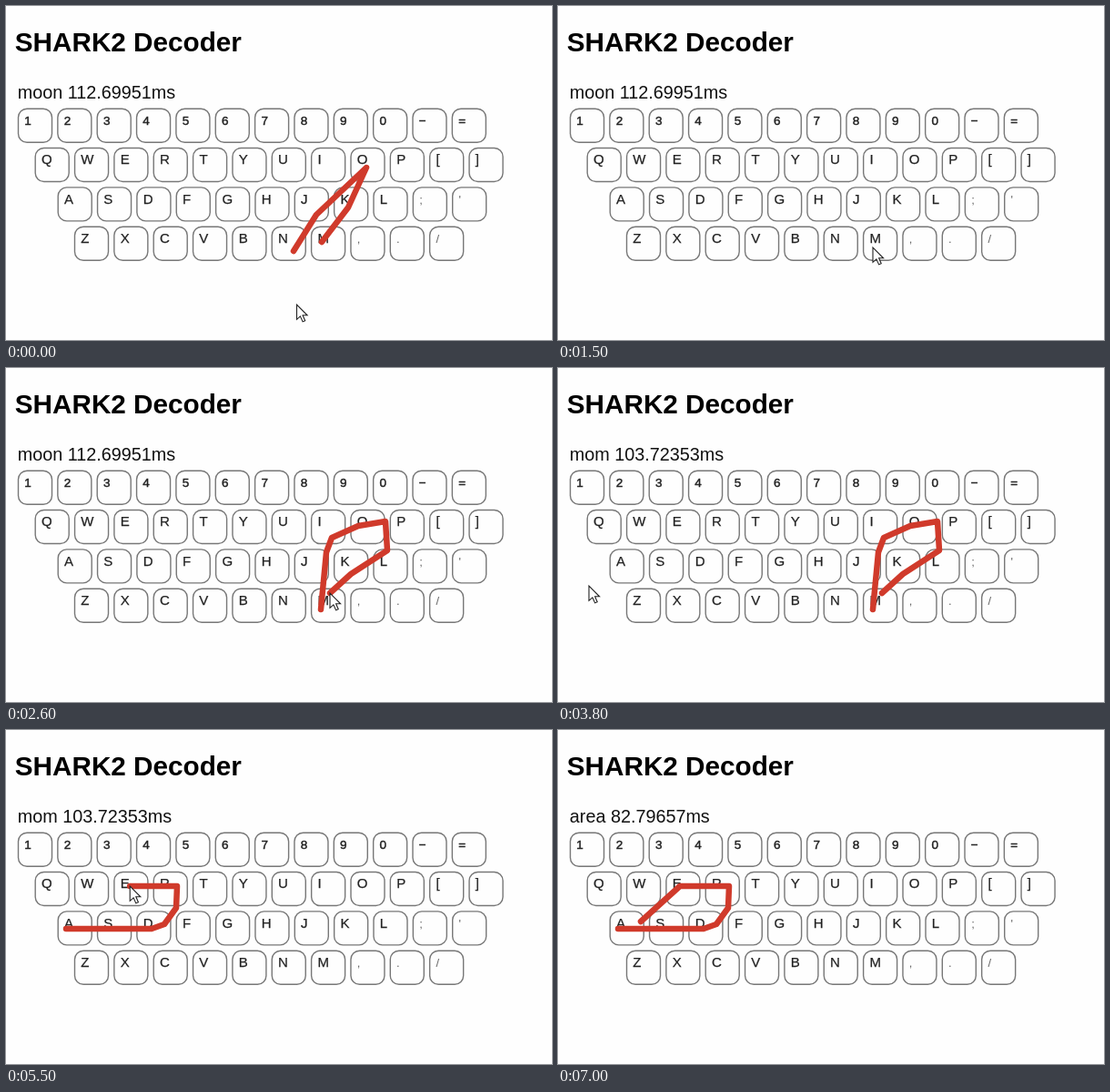
These frames come from a looping animation (600 by 368 pixels, 7300 ms). An HTML page:

```html
<!DOCTYPE html>
<html lang="en">
<head>
<meta charset="utf-8">
<title>SHARK2 Decoder</title>
<style>
  html, body { margin: 0; width: 100%; height: 100%; overflow: hidden; background: #fefefe; }
  svg { display: block; width: 600px; height: 368px; font-family: "Liberation Sans", Arial, sans-serif; }
  .title { font-size: 29.7px; font-weight: bold; }
  .result { font-size: 19.8px; fill: #111; }
  .key rect { fill: #fefefe; stroke: #777; stroke-width: 1.4; }
  .key text { font-size: 15px; fill: #222; stroke: #222; stroke-width: .25; }
  .key .digit { font-size: 13.5px; stroke-width: .45; }
  .key .mark { font-size: 13px; fill: #666; stroke: none; }
  polyline { fill: none; stroke: #d03a2b; stroke-width: 6.5; stroke-linecap: round; stroke-linejoin: round; }
  #cursor { fill: #fff; stroke: #222; stroke-width: 1.1; }
</style>
</head>
<body>
<svg viewBox="0 0 600 368">
  <text class="title" x="9.8" y="49.5">SHARK2 Decoder</text>
  <text class="result" id="result" x="12.8" y="102.3"></text>
  <g id="keys"></g>
  <g id="paths"></g>
  <path id="cursor" d="M0 0V16.3L3.9 12.8 6.6 18.9 9.2 17.8 6.6 11.8H11.6Z"/>
</svg>
<script>
const LOOP = 7300, STEP = 100, PITCH = 43.35;
const $ = id => document.getElementById(id);

function addNode(parent, name, attrs) {
  const node = document.createElementNS("http://www.w3.org/2000/svg", name);
  for (const k in attrs) node.setAttribute(k, attrs[k]);
  return parent.appendChild(node);
}

// Keyboard rows: left edge and labels
const rows = [
  [13.5, "1234567890−="],
  [32.2, "QWERTYUIOP[]"],
  [57.2, "ASDFGHJKL;'"],
  [75.5, "ZXCVBNM,./"]
];
rows.forEach(([left, labels], r) => [...labels].forEach((label, c) => {
  const x = left + c * PITCH, y = 113.2 + r * PITCH;
  const key = addNode($("keys"), "g", { class: "key" });
  addNode(key, "rect", { x, y, width: 37, height: 37, rx: 9.5 });
  const type = r === 0 ? "digit" : ";',./".includes(label) ? "mark" : "";
  addNode(key, "text", { x: x + 6.8, y: y + 17.6, class: type }).textContent = label;
}));

// A move runs along a line through its points; swipes leave ink, glides do not
function move(from, to, points, ink) {
  const line = addNode($("paths"), "polyline", { points, visibility: "hidden" });
  return { from, to, line, ink, length: line.getTotalLength() };
}
const glide = (from, to, points) => move(from, to, points, false);
const swipe = (from, to, points) => move(from, to, points, true);

const moves = [
  swipe(-1, 0, "347,260 376,222 396,178 341,230 316,270"),
  glide(0, 300, "319.5,329 229,333"),
  glide(400, 1000, "229,333 340,236 347,265"),
  swipe(1500, 2600, "346,266 352,203 358,187 387,174 417,169 419,201 379,227 356,248"),
  glide(2600, 3000, "356,248 322,341"),
  glide(3000, 3800, "322,341 180,350 34,240"),
  glide(3900, 4460, "34,240 66,219"),
  swipe(4470, 5800, "66,219 160,219 174,214 187,196 188,172 134,172 91,211"),
  glide(5800, 6300, "91,211 80,341"),
  glide(6500, 7000, "80,341 430,372")
];
const swipes = moves.filter(m => m.ink);
const results = [
  { from: 0, text: "moon 112.69951ms" },
  { from: 2800, text: "mom 103.72353ms" },
  { from: 6000, text: "area 82.79657ms" }
];

const current = (list, t) => list.filter(item => item.from <= t).pop();
const smooth = k => k * k * (3 - 2 * k);

// Distance covered: steady while swiping, eased while gliding
function reach(m, t) {
  const k = Math.min(1, (t - m.from) / (m.to - m.from));
  return m.length * (m.ink ? k : smooth(k));
}

function draw(now) {
  const t = Math.floor((now % LOOP) / STEP) * STEP;
  const active = current(swipes, t), pointer = current(moves, t);
  for (const s of swipes) {
    s.line.setAttribute("visibility", s === active && t > s.from ? "visible" : "hidden");
  }
  active.line.setAttribute("stroke-dasharray", `${reach(active, t)} ${active.length * 2}`);
  const tip = pointer.line.getPointAtLength(reach(pointer, t));
  $("cursor").setAttribute("transform", `translate(${tip.x} ${tip.y})`);
  $("result").textContent = current(results, t).text;
}

const begin = performance.now();
function tick() {
  draw(performance.now() - begin);
  requestAnimationFrame(tick);
}
tick();
</script>
</body>
</html>
```
